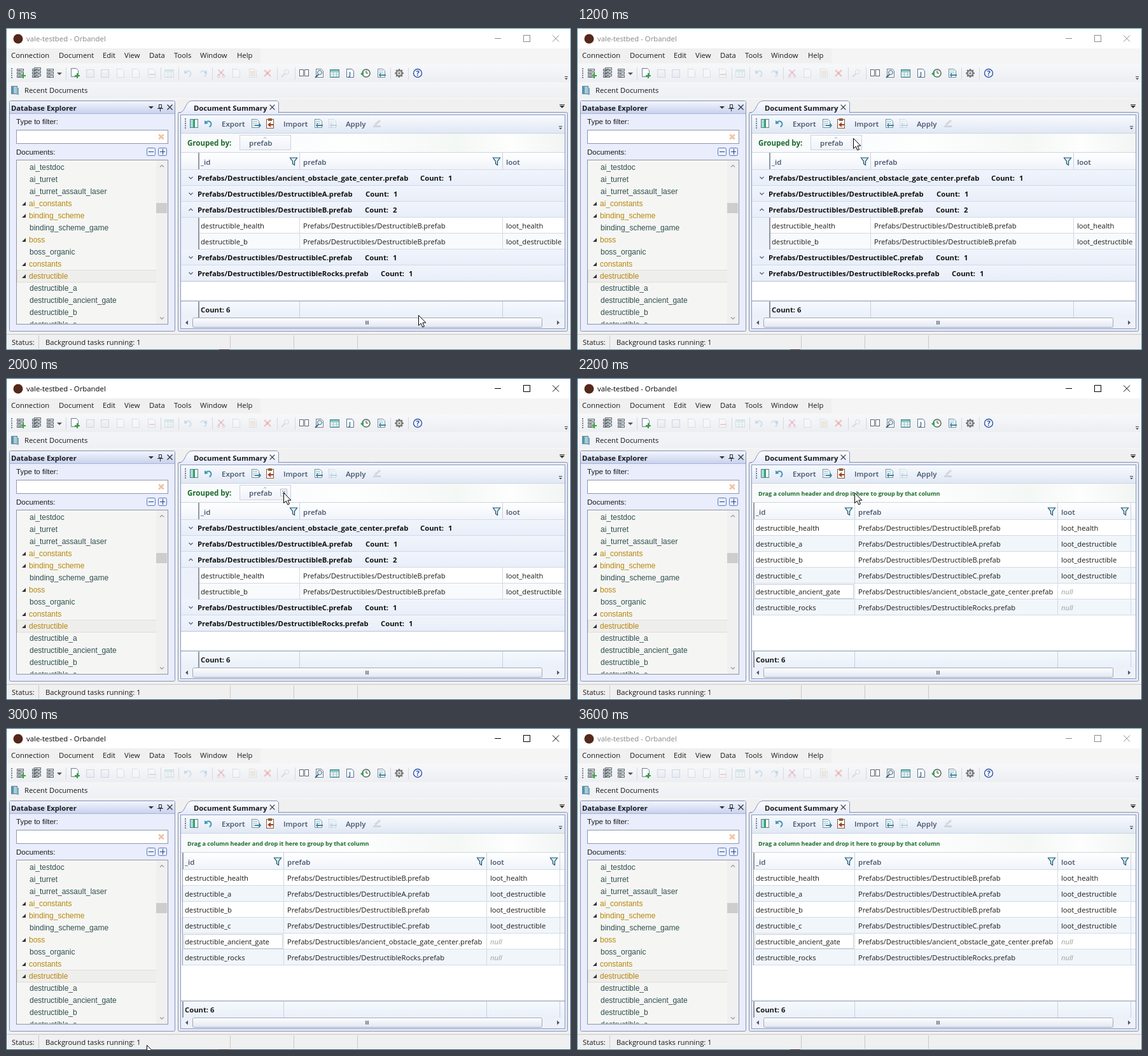
An HTML page with a canvas for the animation above (3800 ms loop, 888 by 506 pixels).

```html
<!DOCTYPE html>
<html>
<head>
<meta charset="utf-8">
<style>
html, body { margin: 0; width: 888px; height: 506px; overflow: hidden; background: #f0f0f0; }
canvas { display: block; }
</style>
</head>
<body>
<canvas id="stage" width="888" height="506"></canvas>
<script>
const ctx = document.getElementById('stage').getContext('2d');
const STEP = 200, STEPS = 19;
const UI = '"Open Sans", "Noto Sans", sans-serif';
const REGULAR = `11.3px ${UI}`, CELL = `11.2px ${UI}`, BOLD = `bold 11.25px ${UI}`;
const SEMI = `600 11.5px ${UI}`, LABEL = '11.5px "Liberation Sans", sans-serif';
const TREE = '12px "Liberation Sans", sans-serif';
const SLATE = '#45536b', GRID = '#d3dae5', BLUE = '#3e5f9a';

// Pointer tip at each step; it leaves the window after the last one.
const POINTER = [[648, 451], [646, 448], [642, 443], [502, 266], [492, 232], [470, 199],
  [434, 173], [435, 177], [436, 180], [436, 180], [436, 180], [436, 180],
  [420, 225], [370, 320], [290, 425], [221, 498]];

function box(x, y, w, h, fill, stroke) {
  if (fill) { ctx.fillStyle = fill; ctx.fillRect(x, y, w, h); }
  if (stroke) { ctx.strokeStyle = stroke; ctx.lineWidth = 1; ctx.strokeRect(x + .5, y + .5, w - 1, h - 1); }
}
function rounded(x, y, w, h, r, fill, stroke) {
  ctx.beginPath();
  ctx.roundRect(x + .5, y + .5, w - 1, h - 1, r);
  ctx.fillStyle = fill; ctx.fill();
  ctx.strokeStyle = stroke; ctx.lineWidth = 1; ctx.stroke();
}
function shade(y, h, top, bottom) {
  const g = ctx.createLinearGradient(0, y, 0, y + h);
  g.addColorStop(0, top); g.addColorStop(1, bottom);
  return g;
}
function text(s, x, middle, font = REGULAR, color = '#1a1a1a') {
  ctx.font = font; ctx.fillStyle = color; ctx.fillText(s, x, middle + 4);
}
function path(points, x, y, fill, stroke, width = 1) {
  ctx.beginPath();
  points.forEach(([px, py]) => ctx.lineTo(x + px, y + py));
  if (fill) { ctx.closePath(); ctx.fillStyle = fill; ctx.fill(); }
  if (stroke) { ctx.strokeStyle = stroke; ctx.lineWidth = width; ctx.stroke(); }
}
function cross(x, y, r, color, width = 1) {
  path([[-r, -r], [r, r]], x, y, null, color, width);
  path([[-r, r], [r, -r]], x, y, null, color, width);
}
function circle(x, y, r, fill, stroke, width = 1) {
  ctx.beginPath(); ctx.arc(x, y, r, 0, 7);
  if (fill) { ctx.fillStyle = fill; ctx.fill(); }
  if (stroke) { ctx.strokeStyle = stroke; ctx.lineWidth = width; ctx.stroke(); }
}
const down = (x, y, r, color) => path([[-r, -r / 2], [r, -r / 2], [0, r / 2]], x, y, color);
const chevron = (x, y, dir, color) =>
  path([[-3, -1.5 * dir], [0, 1.5 * dir], [3, -1.5 * dir]], x, y, null, color, 1.2);
function plus(x, y, color) { box(x - 4, y - 1, 8, 2, color); box(x - 1, y - 4, 2, 8, color); }
function grip(x, y) { for (let i = 0; i < 5; i++) box(x, y + i * 3.5, 2, 2, '#77808f'); }
function overflow(x, y) { box(x - 2, y - 3, 5, 1, '#444'); down(x + .5, y + 1, 2.5, '#444'); }

function database(x, y) {
  for (let i = 0; i < 3; i++) {
    box(x - 6, y - 7 + i * 5, 11, 4, '#dfe3e6', '#616a70');
    box(x - 4, y - 5 + i * 5, 4, 1, '#6f777d');
  }
}
function page(x, y, color = '#6f8094', fill = '#fff') {
  path([[-5.5, -6.5], [2.5, -6.5], [5.5, -3.5], [5.5, 6.5], [-5.5, 6.5], [-5.5, -7]], x, y, fill, color);
}
function sheet(x, y, color = '#4b7f8e') {
  box(x - 8, y - 6, 15, 13, '#fff', color);
  box(x - 7, y - 5, 13, 3, '#7bc4be');
  for (let i = 0; i < 3; i++) box(x - 6, y - 1 + i * 3, 12, 1, '#9bc6c9');
  box(x - 3, y - 3, 1, 9, '#9bc6c9');
  box(x + 2, y - 3, 1, 9, '#9bc6c9');
}
function transfer(x, y, left) {
  page(x, y, '#718b9f');
  for (let i = 0; i < 3; i++) box(x - 4, y - 4 + i * 3, 7, 1, '#7eb1c1');
  const tip = left ? -3 : 3;
  box(x - 1, y + 2, 8, 2, '#3d87a1');
  path([[0, -4], [tip, 0], [0, 4]], x + (left ? -1 : 6), y + 3, '#3d87a1');
}
function arc(x, y, mirror, color) {
  ctx.beginPath(); ctx.arc(x, y + 1, 4.5, 3.5, 7.5);
  ctx.strokeStyle = color; ctx.lineWidth = 2; ctx.stroke();
  path([[-6, -5], [-6, 1], [0, 0]].map(([a, b]) => [a * mirror, b]), x, y, color);
}
function funnel(x, y) {
  path([[-5.5, -5.5], [5.5, -5.5], [1.5, 0], [1.5, 6], [-1.5, 4], [-1.5, 0], [-5.5, -5.5]],
    x, y, '#d4f0f5', '#20506e', 1.2);
}

function drawTitle(active) {
  box(0, 0, 888, 32, '#fff');
  circle(19, 17, 7.5, '#54281b');
  text('vale-testbed - Orbandel', 32, 17, `11.4px ${UI}`, active ? '#000' : '#858585');
  const ink = active ? '#000' : '#8b8b8b';
  box(768, 16, 10, 1, ink);
  box(813, 11, 11, 11, null, ink);
  cross(864, 16.5, 5, ink);
}

function drawToolbars() {
  box(0, 32, 888, 80, '#f5f5f5');
  box(0, 32, 400, 23, '#f0f0f0');
  const menu = { Connection: 8, Document: 83, Edit: 152, View: 186, Data: 225, Tools: 264, Window: 305, Help: 363 };
  for (const name in menu) text(name, menu[name], 43);

  box(2, 57, 884, 28, shade(57, 28, '#f7f8fa', '#eceef2'));
  box(2, 86, 884, 24, shade(86, 24, '#f4f5f7', '#eff0f3'));
  grip(8, 63);
  [23, 47, 70].forEach(x => database(x, 71));
  database(50, 69);
  plus(27, 75, '#35a33f');
  down(84, 72, 4, '#555');
  [94, 243, 271, 324, 426, 454, 604, 632].forEach(x => box(x, 62, 1, 19, '#d5d8df'));
  page(108, 70); plus(112, 75, '#35a33f');

  ctx.globalAlpha = .28;
  [132, 155].forEach(x => { box(x - 6, 65, 13, 13, '#dbe2ec', '#8995ab'); box(x - 3, 66, 7, 4, '#fff'); });
  [180, 204, 229, 362, 388].forEach(x => page(x, 71, '#9ba6b5'));
  box(225, 72, 9, 2, '#d66');
  sheet(257, 71, '#8f9cba');
  arc(286, 71, 1, '#79a9d0'); arc(310, 71, -1, '#79a9d0');
  cross(338, 70, 4.5, '#cc6677', 2); circle(334, 76, 2, null, '#c66'); circle(342, 76, 2, null, '#c66');
  box(384, 67, 8, 9, '#d8bd91');
  cross(411, 71, 5, '#e25b54', 2.5);
  circle(441, 69, 3.5, null, '#8899aa'); path([[0, 0], [-5, 5]], 438, 72, null, '#8899aa', 2);
  ctx.globalAlpha = 1;

  box(461, 65, 7, 11, '#fff', '#5d6670'); box(469, 65, 7, 11, '#fff', '#5d6670');
  page(493, 71, '#6d7a87'); circle(493, 70, 3.5, '#d8edf5', '#45647c'); path([[0, 0], [-5, 5]], 491, 73, null, '#45647c', 2);
  sheet(517, 71);
  page(541, 71, '#5c7287'); text('J', 539, 71, `bold 9px ${UI}`, '#2569a5');
  circle(566, 71, 6, '#fff', '#4b6b5b', 1.5); path([[0, -4], [0, 0], [3, 0]], 566, 71, null, '#333');
  path([[0, -4], [-5, 0], [0, 4]], 562, 72, '#3aa54b');
  transfer(590, 71, true);
  for (let i = 0; i < 8; i++) circle(618 + 5.5 * Math.cos(i * Math.PI / 4), 71 + 5.5 * Math.sin(i * Math.PI / 4), 1.5, '#777');
  circle(618, 71, 4.3, '#ddd', '#777', 2); circle(618, 71, 1.5, '#777');
  circle(647, 71, 6.5, '#f5f8ff', '#3055a5', 1.4); text('?', 644.5, 71, BOLD, '#2448a0');
  overflow(880, 79);

  box(8, 91, 10, 13, '#a9cbd9', '#587f92'); box(8, 91, 4, 13, '#5b93ac'); box(17, 94, 3, 11, '#7da9bc');
  text('Recent Documents', 29, 98);
}

function drawExplorer() {
  rounded(5, 114, 261, 363, 2, '#e9edfc', '#8793b5');
  box(6, 115, 259, 20, shade(115, 20, '#f2f5ff', '#c7d1ed'));
  box(6, 134, 259, 1, '#a9b4d2');
  text('Database Explorer', 8, 126, BOLD);
  down(228, 125, 4, '#333');
  box(240, 120, 5, 6, null, '#333'); box(238, 126, 9, 1, '#333'); box(242, 127, 1, 4, '#333');
  cross(257.5, 124.5, 4, '#333', 1.2);
  text('Type to filter:', 16, 147, LABEL);
  box(16, 160, 239, 22, '#fff', '#8f98a8');
  cross(244, 171, 3.8, '#efc4a5', 2.8);
  text('Documents:', 16, 195, LABEL);
  for (const x of [221, 239]) {
    rounded(x, 188, 14, 13, 2, '#e7f0fe', '#6078b6');
    box(x + 3, 194, 8, 1, '#263f86');
  }
  box(246, 190, 1, 9, '#263f86');

  box(16, 207, 239, 259, '#f5f6f4', '#8d95a4');
  ctx.save();
  ctx.beginPath(); ctx.rect(17, 208, 219, 256.5); ctx.clip();
  const items = ['ai_testdoc', 'ai_turret', 'ai_turret_assault_laser', '*ai_constants', '*binding_scheme',
    'binding_scheme_game', '*boss', 'boss_organic', '*constants', '*destructible', 'destructible_a',
    'destructible_ancient_gate', 'destructible_b', 'destructible_c'];
  box(17, 380, 220, 20, '#eeeeec', '#e5ddd2');
  items.forEach((item, i) => {
    const y = 219 + i * 19, parent = item[0] === '*';
    if (parent) path([[3, -3], [3, 3], [-3, 3]], 28, y, '#333');
    text(item.replace('*', ''), parent ? 36 : 37, y, TREE, parent ? '#b8860b' : '#2f4f4f');
  });
  ctx.restore();
  box(236, 208, 18, 257, '#f0f0f0');
  box(236, 275, 17, 16, '#cdcdcd');
  chevron(245, 217, -1, '#9a9a9a'); chevron(245, 456, 1, '#9a9a9a');
}

function drawSummaryFrame() {
  rounded(270, 132, 613, 345, 2, '#e6ebfb', '#8793b5');
  ctx.beginPath();
  ctx.moveTo(272, 133.5);
  ctx.bezierCurveTo(283, 132, 281, 115.5, 292, 114.5);
  ctx.lineTo(426, 114.5); ctx.lineTo(428.5, 117); ctx.lineTo(428.5, 133.5);
  ctx.fillStyle = shade(114, 20, '#fff', '#e6ebfb'); ctx.fill();
  ctx.strokeStyle = '#8793b5'; ctx.lineWidth = 1; ctx.stroke();
  text('Document Summary', 295, 126, BOLD);
  cross(418.5, 124.5, 3.8, '#333', 1.2);
  box(870, 120, 8, 1, '#333'); down(874, 124, 4, '#333');

  box(274, 136, 605, 337, '#fff', '#8c9bb8');
  box(275, 137, 603, 28, shade(137, 28, '#f7faff', '#e1e8f3'));
  box(275, 165, 603, 1, '#cbd4e3');
  grip(281, 142);
  box(289, 143, 13, 14, '#fff', '#53818d'); box(290, 144, 4, 12, '#a6dce1'); box(294, 144, 3, 12, '#36a061');
  arc(318, 150, 1, '#4693b8');
  text('Export', 339, 151, SEMI, SLATE);
  transfer(392, 150, false);
  box(409, 143, 12, 15, '#fff', '#805a35'); box(412, 142, 6, 4, '#8b603b');
  path([[0, -4], [-5, 0], [0, 4]], 416, 152, '#a64024'); box(415, 151, 5, 2, '#a64024');
  text('Import', 436, 151, SEMI, SLATE);
  transfer(491, 150, true);
  ctx.globalAlpha = .25; transfer(513, 150, true);
  path([[-6, 5], [6, 5], [6, 2], [-6, 2]], 583, 151, '#888'); path([[-3, 1], [5, -6]], 583, 151, null, '#888', 3);
  ctx.globalAlpha = 1;
  text('Apply', 534, 151, SEMI, SLATE);
  overflow(871, 157);

  const strip = ctx.createLinearGradient(275, 0, 878, 0);
  [[0, '#f8f9fb'], [.45, '#fdfefe'], [.72, '#f4f8f5'], [.86, '#fdfefd'], [1, '#f1f5f3']].forEach(s => strip.addColorStop(...s));
  box(275, 166, 603, 29, strip);
  box(275, 195, 603, 1, '#ccd5e2');
  box(275, 196, 603, 27, shade(196, 27, '#fff', '#eff3f9'));
  box(275, 222, 603, 1, GRID);
  box(275, 429, 603, 26, shade(429, 26, '#f6f9fe', '#eaf0f9'));
  box(275, 428, 603, 2, '#b9c4d5');

  box(275, 455, 603, 17, '#eef1f8');
  path([[2, -3.5], [2, 3.5], [-2, 0]], 284, 463, '#4d586c');
  path([[-2, -3.5], [-2, 3.5], [2, 0]], 868, 463, '#4d586c');
  rounded(293, 455, 550, 16, 2, shade(455, 16, '#fff', '#dfe5f1'), '#a0a9ba');
  [565, 567, 569].forEach(x => box(x, 460, 1, 6, '#4e596d'));
}

function drawColumns(edge, lines, headers, funnels) {
  [[196, 26], [430, 25]].forEach(([y, h]) => {
    box(edge, y, 2, h, '#9299a4');
    lines.forEach(x => box(x, y, 1, h, '#c8d0dd'));
  });
  ['_id', 'prefab', 'loot'].forEach((name, i) => text(name, headers[i], 211, SEMI, SLATE));
  funnels.forEach(x => funnel(x, 209.5));
  text('Count: 6', headers[0], 443, BOLD);
}

const asset = name => `Prefabs/Destructibles/${name}.prefab`;

function drawGrouped(hover) {
  text('Grouped by:', 285, 181, `bold 11.5px ${UI}`, '#1c6b2c');
  box(367, 168, 81, 24, shade(168, 24, '#fdfdff', '#eff2f8'), '#cbd2df');
  path([[-3, 1.5], [3, 1.5], [0, -1.5]], 407, 172, '#b7d3e6');
  text('prefab', 382, 181, SEMI, SLATE);
  if (hover) {
    box(431, 174, 11, 12, '#f4f6fb', hover > 1 ? '#b7bfce' : '#dfe4ec');
    if (hover > 1) cross(436.5, 179.5, 2.5, '#69758a');
  }
  const groups = [['ancient_obstacle_gate_center', 1, 651, 236], ['DestructibleA', 1, 565, 261],
    ['DestructibleB', 2, 564, 286], ['DestructibleC', 1, 564, 361], ['DestructibleRocks', 1, 589, 386]];
  for (const [name, count, x, y] of groups) {
    box(275, y - 13, 603, 25, shade(y - 13, 25, '#f0f4fc', '#e8eef9'));
    box(275, y + 11, 603, 1, GRID);
    chevron(290.5, y - .5, count > 1 ? -1 : 1, '#4c5a70');
    text(asset(name), 301, y, BOLD, '#111');
    text('Count:', x, y, BOLD, '#111');
    text(count, x + 44, y, BOLD, '#111');
  }
  [['health', 311], ['b', 336]].forEach(([name, y], i) => {
    box(275, y - 13, 603, 25, i ? '#f8fafc' : '#fff');
    box(275, y - 13, 27, 25, '#edf2fa');
    box(302, y + 11, 576, 1, GRID);
    box(302, y - 13, 2, 25, '#9299a4');
    [461, 780].forEach(x => box(x, y - 13, 1, 25, GRID));
    text('destructible_' + name, 306, y, CELL);
    text(asset('DestructibleB'), 467, y, CELL);
    text(i ? 'loot_destructible' : 'loot_health', 786, y, CELL);
  });
  box(275, 398, 603, 1, GRID);
  drawColumns(302, [461, 780], [306, 467, 786], [452, 771]);
}

function drawFlat() {
  text('Drag a column header and drop it here to group by that column', 285, 180.5, `bold 9.05px ${UI}`, '#1c6b2c');
  const rows = [['health', 'DestructibleB', 'loot_health'], ['a', 'DestructibleA', 'loot_destructible'],
    ['b', 'DestructibleB', 'loot_destructible'], ['c', 'DestructibleC', 'loot_destructible'],
    ['ancient_gate', 'ancient_obstacle_gate_center'], ['rocks', 'DestructibleRocks']];
  rows.forEach(([id, prefab, loot], i) => {
    const y = 236 + i * 25;
    box(275, y - 13, 603, 25, i % 2 ? '#f1f6fb' : '#fff');
    box(278, y + 11, 600, 1, GRID);
    box(277, y - 13, 1, 25, '#9299a4');
    [436, 755, 870].forEach(x => box(x, y - 13, 1, 25, GRID));
    if (i === 4) box(279, y - 12, 156, 23, '#fff', '#c5cbd5');
    text('destructible_' + id, 281, y, CELL);
    text(asset(prefab), 442, y, CELL);
    if (loot) text(loot, 761, y, CELL);
    else text('null', 761, y, `italic 11.2px ${UI}`, '#9a9a9a');
  });
  drawColumns(277, [436, 755, 870], [281, 442, 761], [427, 746, 861]);
}

function drawStatus() {
  box(0, 481, 888, 25, '#f0f0f0');
  box(0, 481, 888, 1, '#c9c9c9');
  [51, 352, 452, 552].forEach(x => box(x, 483, 1, 21, '#c8c8c8'));
  text('Status:', 9, 494);
  text('Background tasks running: 1', 62, 494);
}

function drawPointer([x, y]) {
  path([[0, 0], [0, 16], [3.7, 12.6], [6.3, 18.5], [8.9, 17.4], [6.4, 11.6], [11.3, 11.6], [0, 0]],
    x + .5, y + .5, '#fff', '#000');
}

function frame(now) {
  const step = Math.floor(now / STEP) % STEPS;
  const active = step >= 9 && step < 18;
  box(0, 0, 888, 506, '#f0f0f0');
  drawTitle(active);
  drawToolbars();
  drawExplorer();
  drawSummaryFrame();
  if (step < 11) drawGrouped(step < 6 ? 0 : step < 7 ? 1 : 2);
  else drawFlat();
  drawStatus();
  box(0, 0, 888, 506, null, active ? '#255a80' : '#568ca5');
  box(335, 505, 16, 1, '#333');
  if (POINTER[step]) drawPointer(POINTER[step]);
  requestAnimationFrame(frame);
}
requestAnimationFrame(frame);
</script>
</body>
</html>
```
